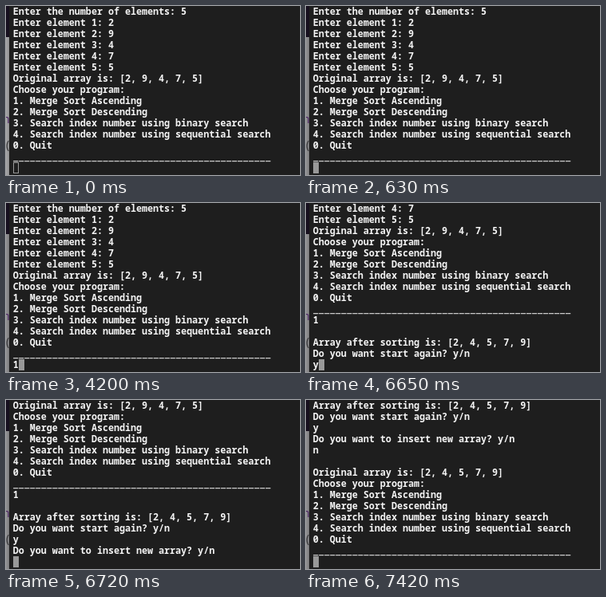
An HTML page with a canvas for the animation above (8 s loop, 368 by 212 pixels).

```html
<!DOCTYPE html>
<html lang="en">
<head>
<meta charset="utf-8">
<title>Sorting program in a terminal</title>
<style>
html, body { margin: 0; width: 100%; height: 100%; overflow: hidden; background: #1e1e1e; }
canvas { display: block; }
</style>
</head>
<body>
<canvas id="stage" width="368" height="212"></canvas>
<script>
const ctx = document.getElementById('stage').getContext('2d');
const LOOP = 8000, ROWS = 15, LINE = 14, CELL = 7.02, LEFT = 8.7;
const RULE = '_'.repeat(46);

const menu = array => [
  `Original array is: [${array}]`,
  'Choose your program:',
  '1. Merge Sort Ascending',
  '2. Merge Sort Descending',
  '3. Search index number using binary search',
  '4. Search index number using sequential search',
  '0. Quit',
  RULE
];
const values = [2, 9, 4, 7, 5];
const start = [
  'Enter the number of elements: 5',
  ...values.map((v, i) => `Enter element ${i + 1}: ${v}`),
  ...menu(values.join(', '))
];
const sorted = [...start, '1', '', 'Array after sorting is: [2, 4, 5, 7, 9]', 'Do you want start again? y/n'];
const again = [...sorted, 'y', 'Do you want to insert new array? y/n'];
const restarted = [...again, 'n', '', ...menu('2, 4, 5, 7, 9')];

// Time, printed lines, current input
const steps = [
  [0, start, ''],
  [4200, start, '1'],
  [4620, sorted, ''],
  [6650, sorted, 'y'],
  [6720, again, ''],
  [7280, again, 'n'],
  [7420, restarted, '']
];

function rect(x, y, w, h, color) {
  ctx.fillStyle = color;
  ctx.fillRect(x, y, w, h);
}

function drawBackdrop(t) {
  rect(0, 0, 6, 39, '#17101f');
  const light = t < 560 ? 168 : t < 630 ? 158 : 148;
  const shade = ctx.createLinearGradient(0, 0, 5, 0);
  shade.addColorStop(0, `rgb(${light}, ${light}, ${light + 2})`);
  shade.addColorStop(1, `rgb(${light - 30}, ${light - 30}, ${light - 28})`);
  rect(0, 39, 6, 173, shade);
  ctx.font = '14px "Noto Sans", sans-serif';
  ctx.fillStyle = '#4b2463';
  ctx.fillText('h', -4, 147);
  ctx.fillStyle = '#333336';
  ctx.fillText('(', 0, 179);
  rect(4, 0, 364, 212, '#1e1e1e');
}

function drawLine(text, row) {
  const y = row * LINE + 11;
  if (text !== RULE) {
    ctx.fillText(text, LEFT, y);
    return;
  }
  for (let i = 0; i < text.length; i++) ctx.fillRect(LEFT + i * CELL + 0.4, y + 1.2, 6.2, 1);
}

function drawCursor(column, focused) {
  const x = 9 + column * 7, y = (ROWS - 1) * LINE;
  if (focused) {
    rect(x, y, 7, 14, '#989898');
  } else {
    ctx.strokeStyle = '#989898';
    ctx.lineWidth = 1;
    ctx.strokeRect(x + 0.5, y + 0.5, 6, 13);
  }
}

function frame() {
  const t = performance.now() % LOOP;
  const [, lines, input] = steps.findLast(step => step[0] <= t);
  drawBackdrop(t);
  drawCursor(input.length, t >= 560);
  ctx.font = '600 11.7px "Noto Sans Mono", monospace';
  ctx.fillStyle = '#f4f4f4';
  [...lines, input].slice(-ROWS).forEach(drawLine);
  requestAnimationFrame(frame);
}
frame();
</script>
</body>
</html>
```
